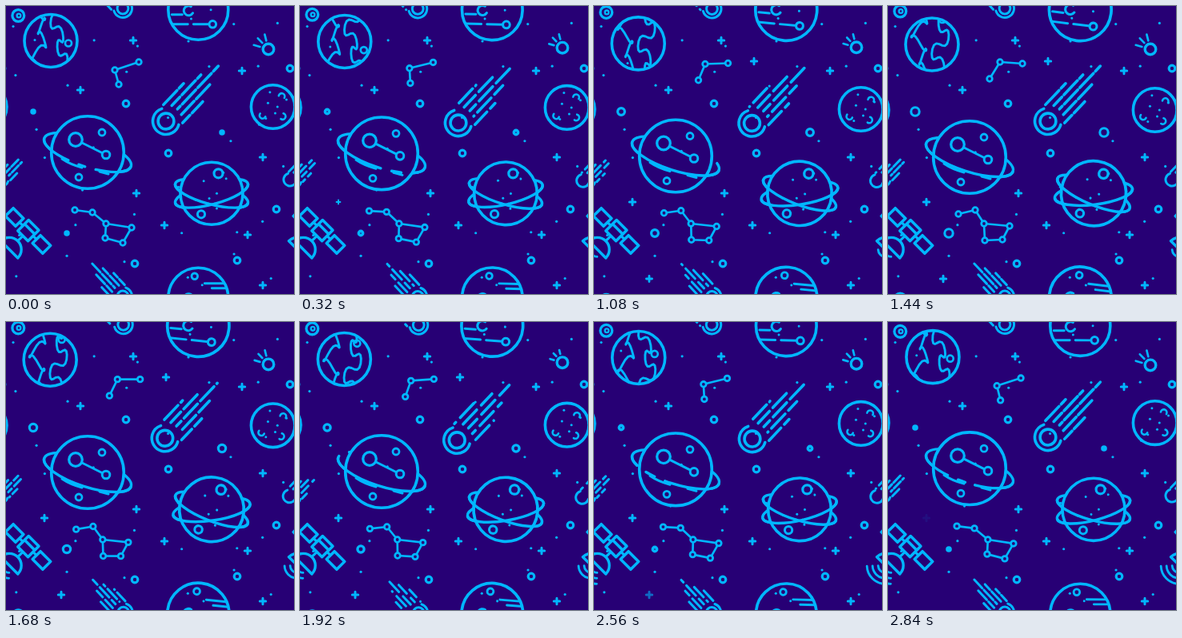
An HTML page with a canvas for the animation above (2.88 s loop, 360 by 360 pixels).

```html
<!DOCTYPE html>
<html lang="en">
<head>
<meta charset="utf-8">
<title>Space pattern</title>
<style>
html, body { margin: 0; width: 100%; height: 100%; overflow: hidden; background: #270075; }
canvas { display: block; width: 360px; height: 360px; }
</style>
</head>
<body>
<canvas id="sky"></canvas>
<script>
const LOOP = 2880, SIZE = 360, INK = '#00b7ff', NIGHT = '#270075', TAU = Math.PI * 2;
const canvas = document.getElementById('sky');
const ctx = canvas.getContext('2d');
const ratio = window.devicePixelRatio || 1;
canvas.width = canvas.height = SIZE * ratio;

const mix = (a, b, k) => a + (b - a) * k;
const ramp = (t, from, length) => Math.min(1, Math.max(0, (t - from) / length));
const rad = deg => deg * Math.PI / 180;

function random(seed) {
  return () => (seed = seed * 16807 % 2147483647) / 2147483647;
}

function at(x, y, turn, draw, scale = 1) {
  ctx.save();
  ctx.translate(x, y);
  ctx.rotate(rad(turn));
  ctx.scale(scale, scale);
  draw();
  ctx.restore();
}

function line(d, width = 3, fill) {
  const path = new Path2D(d);
  ctx.lineWidth = width;
  if (fill) {
    ctx.fillStyle = fill;
    ctx.fill(path);
  }
  ctx.stroke(path);
}

function ring(x, y, r, width = 3, from = 0, to = 360) {
  ctx.lineWidth = width;
  ctx.beginPath();
  ctx.arc(x, y, r, rad(from), rad(to));
  ctx.stroke();
}

function disc(x, y, r, color = INK) {
  ctx.fillStyle = color;
  ctx.beginPath();
  ctx.arc(x, y, r, 0, TAU);
  ctx.fill();
}

function hollow(x, y, r, width) {
  disc(x, y, r, NIGHT);
  ring(x, y, r, width);
}

function plus(x, y, size = 1, alpha = 1) {
  if (!size || !alpha) return;
  ctx.globalAlpha = alpha;
  at(x, y, 0, () => line('M-3.7 0H3.7M0-3.7V3.7', 3), size);
  ctx.globalAlpha = 1;
}

// Jittered grid: even cover without visible rows.
function specks() {
  const next = random(41), cells = 6, cell = SIZE / cells;
  for (let i = 0; i < cells * cells; i++) {
    const x = (i % cells + mix(0.15, 0.85, next())) * cell;
    const y = (Math.floor(i / cells) + mix(0.15, 0.85, next())) * cell;
    disc(x, y, 1.6);
  }
}

function speckle(radius, count, seed) {
  const next = random(seed);
  for (let i = 0; i < count; i++) {
    const angle = (i + next()) * TAU / count, r = radius * mix(0.15, 0.8, next());
    disc(r * Math.cos(angle), r * Math.sin(angle), 1.5);
  }
}

const PLUSES = [[159, 43], [93, 105], [295, 81], [321, 189], [163, 234], [198, 274], [302, 286], [321, 349]];
const BLINKS = [[48, 245, 60, 2860], [200, 69, 440, 2390], [69, 341, 700, 2700]];
const RINGS = [[150, 122], [203, 184], [161, 322], [289, 318], [355, 78], [338, 254]];
const PULSES = [[34, 132], [270, 158], [76, 284]];

function stars(t, k) {
  specks();
  PLUSES.forEach(([x, y]) => plus(x, y));
  BLINKS.forEach(([x, y, start, end]) => plus(x, y, ramp(t, start, 400), 1 - ramp(t, end - 240, 240)));
  RINGS.forEach(([x, y]) => hollow(x, y, 3.8, 3.2));
  PULSES.forEach(([x, y]) => hollow(x, y, mix(1.9, 5.2, k), mix(3.7, 3.1, k)));
  const y = mix(12, 6.5, k);
  hollow(15.3, y, 7.4, 3.3);
  ring(16, y, 2.4, 2.3);
}

// Each node: position and drift.
const TRIO = [[141, 98, -14, -7], [136, 80, 4, -10], [166, 70, 2, 2]];
const DIPPER = [[86, 255, 2, 5], [108, 258, 1, -3], [125, 272, -5, 0],
  [157, 277, -5, -2], [146, 296, -3, -4], [124, 290, -3, 3]];

function constellation(nodes, k, closeAt) {
  const points = nodes.map(([x, y, dx, dy]) => [x + dx * k, y + dy * k]);
  line('M' + points.concat(closeAt ? [points[closeAt]] : []).join('L'), 2.7);
  points.forEach(([x, y]) => hollow(x, y, 3.3, 2.8));
}

// Tail lines run along +x, shorter toward the sides; gaps open with the swing.
function comet(x, y, turn, r, length, tails, swing) {
  const width = r > 15 ? 3.6 : 3;
  at(x, y, turn, () => {
    for (let i = 0; i < tails; i++) {
      const v = mix(-r, r, i / (tails - 1));
      const from = Math.sqrt(1.6 * r * r - v * v);
      ctx.setLineDash([r * 1.5, width + 6 * swing]);
      ctx.lineDashOffset = i * r * 0.6 - swing * 14;
      line(`M${from} ${v}H${length - Math.abs(v) * length * 0.48 / r}`, width);
    }
    ctx.setLineDash([]);
    ring(0, 0, r, width, 62, 298);
    if (r > 10) ring(0, 0, r * 0.6, width);
  });
}

function smallComet(swing) {
  at(328, 54 - 4.5 * swing, 0, () => {
    ring(0, 0, 6.8, 3.4);
    for (let i = 0; i < 3; i++)
      at(0, 0, 196 + 30 * i, () => line(`M11 0H${mix(19, 15, swing)}`, 2.7));
  });
}

function globe(r, surface) {
  disc(0, 0, r, NIGHT);
  ctx.save();
  ctx.beginPath();
  ctx.arc(0, 0, r, 0, TAU);
  ctx.clip();
  surface();
  ctx.restore();
  ring(0, 0, r, 3.6);
}

// Back half is hidden by the globe drawn between the two passes.
function orbit(a, b, tilt, frontOnly, dash = [], offset = 0) {
  at(0, 0, tilt, () => {
    if (frontOnly) {
      ctx.beginPath();
      ctx.rect(-a - 5, 0, 2 * a + 10, b + 5);
      ctx.clip();
    }
    ctx.setLineDash(dash);
    ctx.lineDashOffset = offset;
    ctx.lineWidth = 3.4;
    ctx.beginPath();
    ctx.ellipse(0, 0, a, b, 0, TAU / 4, TAU * 1.25);
    ctx.stroke();
  });
}

// A meandering shore that repeats every `period` pixels downwards.
function coast(x, phase, period) {
  const points = [];
  for (let a = -TAU; a < 2 * TAU; a += 0.2) {
    const px = x + 7 * Math.sin(2 * a + phase) + 5 * Math.sin(a - phase);
    points.push([px, a / TAU * period + 5 * Math.sin(4 * a + phase)]);
  }
  line('M' + points.join('L'), 2.9);
}

function earth(p, k) {
  const period = 68;
  at(mix(56, 55, k), mix(43.5, 48, k), 0, () => globe(33, () => {
    for (const turn of [p - 1, p]) at(18 * turn, period * turn, 0, () => {
      hollow(22, 3, 4, 2.7);
      disc(-20, -1, 1.5);
    });
    at(0, period * p - period / 2, 0, () => {
      coast(-14, 0.6, period);
      coast(11, 3, period);
    });
  }));
}

function saturn(p, k) {
  const dash = [215, 14, 12, 14], offset = 255 * p - 20;
  at(102, mix(183, 189, k), 0, () => {
    orbit(57, 18, 18, false, dash, offset);
    globe(45.3, () => {
      speckle(45, 3, 5);
      line('M-15-16L23 3M-32 8Q-22 15-7 19M15 24L26 27');
      hollow(-15, -16, 8.3, 3.3);
      hollow(23, 3, 4.8, 3);
      hollow(18, -25, 4, 2.8);
      hollow(-11, 31, 4, 2.8);
    });
    orbit(57, 18, 18, true, dash, offset);
  });
}

function crossedPlanet(k) {
  const tilts = [15, -15];
  at(257, 234.3, 8 * k, () => {
    tilts.forEach(tilt => orbit(47, 13.5, tilt, false));
    globe(39, () => {
      speckle(39, 7, 23);
      hollow(8.5, -25, 5.5, 3.2);
      hollow(-13, 26, 4.6, 3);
    });
    tilts.forEach(tilt => orbit(47, 13.5, tilt, true));
  }, mix(1, 1.04, k));
}

function moon(k) {
  at(333.7, mix(126, 130, k), 0, () => globe(27.3, () => {
    speckle(24, 6, 77);
    for (let i = 0; i < 3; i++) {
      const angle = rad(95 * i - 50 + 10 * k);
      ring(17 * Math.cos(angle), 17 * Math.sin(angle), 3.8, 2.6, 95 * i + 190, 95 * i + 390);
    }
  }));
}

function stripedPlanet(k) {
  at(240.3, 4.8, 7 * k, () => globe(37.5, () => {
    line('M-6 18H14M-33 6H-20M-33 18H-13M8-18H32M17-12H36', 2.9);
    ring(-12, 1, 6, 3, 30, 300);
    hollow(18, 18, 4.3, 3);
    hollow(-4.5, -27, 3.8, 2.8);
    speckle(30, 3, 12);
  }), mix(1, 1.035, k));
}

function satellite(t) {
  at(27.5, 281, 45, () => {
    line('M-15 0H15M0 8V18', 3.2);
    for (const x of [-33, 15]) line(`M${x}-7h18v14h-18z`, 3.5, NIGHT);
    line('M-9-10h18v19h-18zM-9-3h18', 3.5, NIGHT);
    line('M-15 33A15 15 0 0 1 15 33Z', 3.4, NIGHT);
    for (let i = 0; i < 3; i++) {
      ctx.globalAlpha = ramp(t, 900 + 580 * i, 160);
      if (ctx.globalAlpha) ring(0, 33, 9 + 7 * i, 2.8, 47, 133);
    }
  });
}

function scene(t) {
  const p = t / LOOP;
  const k = 1 - Math.abs(1 - 2 * p);
  const swing = (1 - Math.cos(2 * TAU * p)) / 2;
  stars(t, k);
  constellation(TRIO, k);
  constellation(DIPPER, k, 2);
  comet(200 - 5 * swing, 144 + 5 * swing, -46.5, 16.5, 95, 5, swing);
  comet(146 + 3 * swing, 3 + swing, -133, 11.5, 56, 5, swing);
  comet(355 - 3 * swing, 217 + 3 * swing, -46, 8, 39, 4, swing);
  smallComet(swing);
  earth(p, k);
  saturn(p, k);
  crossedPlanet(k);
  moon(k);
  stripedPlanet(k);
  satellite(t);
}

function frame() {
  const t = Math.floor(performance.now() % LOOP / 40) * 40;
  ctx.setTransform(ratio, 0, 0, ratio, 0, 0);
  ctx.fillStyle = NIGHT;
  ctx.fillRect(0, 0, SIZE, SIZE);
  ctx.strokeStyle = INK;
  ctx.lineCap = ctx.lineJoin = 'round';
  // The pattern tiles seamlessly, so neighbours spill over the edges.
  for (const x of [-SIZE, SIZE, 0])
    for (const y of [-SIZE, SIZE, 0]) at(x, y, 0, () => scene(t));
  requestAnimationFrame(frame);
}
frame();
</script>
</body>
</html>
```
